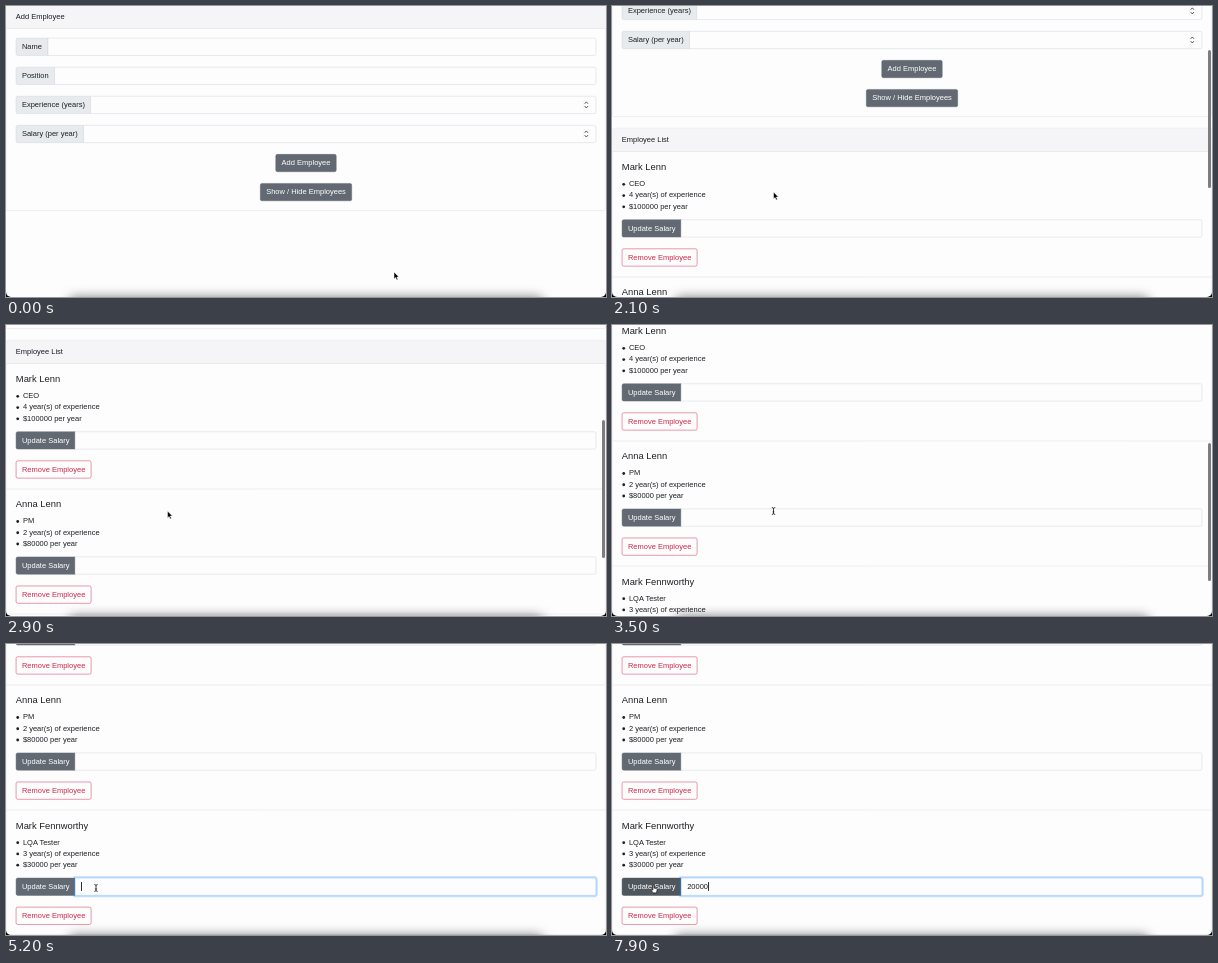
Recreate the animation shown at these times as an HTML page. Size 600 by 291 pixels, loop 8 s.

```html
<!DOCTYPE html>
<html lang="en">
<head>
<meta charset="utf-8">
<title>Employee form</title>
<style>
* { box-sizing: border-box; }
html, body { margin: 0; width: 100%; height: 100%; overflow: hidden; background: #000; }
#stage {
  position: absolute; left: 0; top: 0; width: 600px; height: 291px; overflow: hidden;
  background: #fefdfe; border-radius: 0 0 5px 5px;
}
#page {
  position: absolute; left: 0; top: 0; width: 1280px; transform-origin: 0 0;
  font: 16px/24px "Liberation Sans", Arial, sans-serif; color: #1d2024;
}
.card { border: 1px solid #dcdbdd; border-radius: 4px; }
.form { margin-top: -2px; }
.list { margin-top: 24px; }
.head { height: 49px; padding: 12px 20px; background: #f5f4f6; border-bottom: 1px solid #dcdbdd; }
.body { padding: 20px; text-align: center; }
.row { display: flex; position: relative; height: 38px; margin-bottom: 24px; text-align: left; }
.tag { padding: 6px 12px; border: 1px solid #ced3d9; border-radius: 4px 0 0 4px; background: #e8ebee; }
.field {
  flex: 1; position: relative; margin-left: -1px; padding: 6px 12px; white-space: pre;
  border: 1px solid #ced3d9; border-radius: 0 4px 4px 0; background: #fefdfe;
}
.field.focus { border-color: #80bdff; box-shadow: 0 0 0 3.2px rgba(0, 123, 255, .25); z-index: 3; }
.field svg { position: absolute; right: 13px; top: 7px; }
.caret { display: inline-block; width: 2px; height: 19px; vertical-align: -4px; background: #222; }
.btn {
  display: block; width: max-content; height: 38px; padding: 6px 12px; border: 1px solid #626972;
  border-radius: 4px; background: #626972; color: #fff;
}
.btn.hover { background: #50565d; border-color: #4c5258; }
.body .btn { margin: 0 auto 24px; }
.body .btn:last-child { margin-bottom: 0; }
.row .btn { border-radius: 4px 0 0 4px; }
.btn.remove { background: none; border-color: #cb2a4a; color: #cb2a4a; }
.item { height: 267px; padding: 20px 20px 21px; border: solid #dcdbdd; border-width: 1px 0; border-radius: 4px; }
.item h5 { margin: 0 0 12px; font-size: 20px; line-height: 24px; font-weight: 400; }
.item ul { margin: 0 0 16px; padding: 0 0 0 15px; list-style: none; }
.item li { position: relative; }
.item li::before {
  content: ""; position: absolute; left: -14.5px; top: 10px; width: 6px; height: 6px;
  border-radius: 50%; background: #1d2024;
}
#dock {
  position: absolute; left: 64px; top: 293px; width: 472px; height: 12px;
  border-radius: 6px; box-shadow: 0 0 11px 2px rgba(0, 0, 0, .5);
}
#thumb { position: absolute; left: 596px; width: 3px; border-radius: 2px; background: #7d7c7e; }
#cursor { position: absolute; left: 0; top: 0; width: 20px; height: 20px; overflow: visible; }
</style>
</head>
<body>
<div id="stage">
  <div id="page"></div>
  <div id="thumb"></div>
  <div id="dock"></div>
  <svg id="cursor" viewBox="0 0 20 20">
    <path id="arrow" d="M0 0V6.9L1.6 5.5L2.7 8L3.9 7.5L2.8 5H4.9Z" fill="#000" stroke="#fff" stroke-width=".5"/>
    <path id="beam" d="M-1.7 -3.4Q0 -3.4 0 -2.4Q0 -3.4 1.7 -3.4M0 -2.6V2.6M-1.7 3.4Q0 3.4 0 2.4Q0 3.4 1.7 3.4M-.9 .9H.9" fill="none" stroke="#111" stroke-width=".8"/>
    <path id="hand" d="M-.6 0Q0 -.7 .6 0V2.6L3 3.1Q3.8 3.4 3.7 4.3L3 7.4H-.5L-2.5 4.4Q-2.6 3.5 -1.7 3.7L-.6 4.7Z" fill="#fff" stroke="#111" stroke-width=".7"/>
  </svg>
</div>
<script>
const SCALE = 600 / 1280, VIEW = 291, PAGE = 615, LOOP = 8000, STEP = 100;
const $ = id => document.getElementById(id);

const staff = [
  ["Mark Lenn", "CEO", 4, 100000],
  ["Anna Lenn", "PM", 2, 80000],
  ["Mark Fennworthy", "LQA Tester", 3, 30000]
];

const spinner = `<svg width="14" height="22" viewBox="0 0 14 22">
  <rect x=".5" y=".5" width="13" height="21" rx="4" fill="#fff" stroke="#e6e5e8"/>
  <path d="M3.5 8.5L7 4.5L10.5 8.5M3.5 13.5L7 17.5L10.5 13.5" fill="none" stroke="#333" stroke-width="1.8"/></svg>`;

const input = (label, extra = "") =>
  `<div class="row"><div class="tag">${label}</div><div class="field">${extra}</div></div>`;

const item = ([name, job, years, pay]) => `<div class="item"><h5>${name}</h5>
  <ul><li>${job}</li><li>${years} year(s) of experience</li><li>$${pay} per year</li></ul>
  <div class="row"><div class="btn update">Update Salary</div><div class="field pay"></div></div>
  <div class="btn remove">Remove Employee</div></div>`;

$("page").innerHTML = `<div class="card form"><div class="head">Add Employee</div><div class="body">
  ${input("Name")}${input("Position")}${input("Experience (years)", spinner)}${input("Salary (per year)", spinner)}
  <div class="btn">Add Employee</div><div class="btn" id="toggle">Show / Hide Employees</div></div></div>
  <div class="card list" id="list"><div class="head">Employee List</div>${staff.map(item).join("")}</div>`;

const update = document.querySelectorAll(".update")[2];
const pay = document.querySelectorAll(".pay")[2];

// Tracks hold [time, value, ...] keys joined by straight lines.
const scrollTrack = [
  [1800, 0], [1900, 20], [2000, 58], [2100, 94], [2200, 122], [2300, 140], [2500, 140], [2600, 152],
  [2800, 188], [3000, 214], [3200, 231], [3400, 240], [3500, 249], [3700, 286], [3900, 314], [4100, 324]
];
const mouseTrack = [
  [0, 388, 266], [200, 305, 212], [300, 305, 212], [400, 304, 205], [500, 302, 193], [600, 301, 188],
  [1100, 301, 188], [1200, 278, 189], [1400, 195, 189], [1600, 161.5, 186], [4100, 161.5, 186],
  [4300, 92, 234], [4700, 90, 244], [7200, 90, 244], [7600, 50, 243], [7900, 41.5, 241.5]
];
const typing = [[5900, "2"], [6000, "20"], [6400, "200"], [6600, "2000"], [6700, "20000"]];

function sample(track, t) {
  const n = track.findIndex(k => k[0] > t);
  if (n === 0) return track[0].slice(1);
  if (n < 0) return track[track.length - 1].slice(1);
  const a = track[n - 1], b = track[n], p = (t - a[0]) / (b[0] - a[0]);
  return a.slice(1).map((v, i) => v + (b[i + 1] - v) * p);
}

const inside = (x, y, l, t, r, b) => x >= l && x < r && y >= t && y < b;

function draw(t) {
  const [scroll] = sample(scrollTrack, t);
  const [x, y] = sample(mouseTrack, t);
  const pageY = y + scroll, listed = t >= 1100;

  $("page").style.transform = `translateY(${-scroll}px) scale(${SCALE})`;
  $("list").style.visibility = listed ? "visible" : "hidden";

  const thumb = $("thumb").style;
  thumb.top = scroll / PAGE * VIEW + "px";
  thumb.height = VIEW * VIEW / PAGE + "px";
  thumb.opacity = t < 1900 ? 0 : Math.max(0, Math.min(1, (5100 - t) / 300));

  const overToggle = inside(x, pageY, 254, 178, 346, 196);
  const overUpdate = listed && inside(x, pageY, 10, 558, 70, 576);
  const overField = listed && x > 70 && x < 590 &&
    [308, 433, 558].some(top => pageY >= top && pageY < top + 18);
  $("toggle").classList.toggle("hover", overToggle);
  update.classList.toggle("hover", overUpdate);

  const kind = overToggle || overUpdate ? "hand" : overField ? "beam" : "arrow";
  for (const id of ["arrow", "beam", "hand"]) $(id).style.display = id === kind ? "" : "none";
  $("cursor").style.transform = `translate(${x}px, ${y}px)`;
  $("cursor").style.visibility = t >= 5900 && t < 7200 ? "hidden" : "visible";

  const focused = t >= 4900;
  const text = typing.reduce((s, [at, v]) => t >= at ? v : s, "");
  const caret = focused && !(t >= 5500 && t < 5900);
  pay.classList.toggle("focus", focused);
  pay.innerHTML = text + (caret ? '<span class="caret"></span>' : "");
}

const start = performance.now();
function tick() {
  const t = (performance.now() - start) % LOOP;
  draw(Math.floor(t / STEP) * STEP);
  requestAnimationFrame(tick);
}
tick();
</script>
</body>
</html>
```
